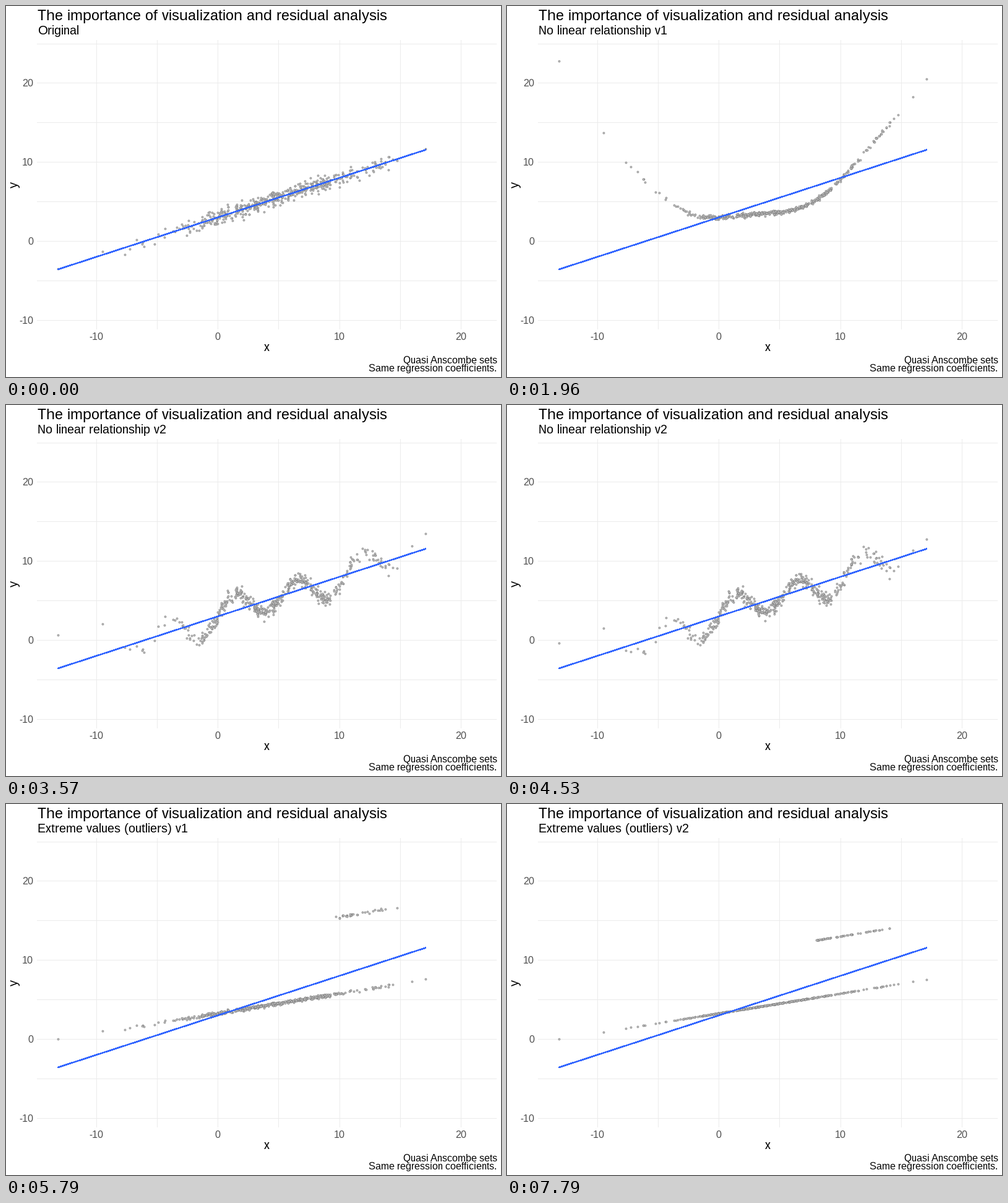
These frames come from a looping animation (800x600 px, 8000 ms). A matplotlib script:

```python
import matplotlib.pyplot as plt
import numpy as np
from matplotlib.animation import FuncAnimation

# whole-pixel glyph advances
plt.rcParams.update({"font.family": "Liberation Sans",
                     "text.hinting": "default", "text.hinting_factor": 1})

LOOP, STEP = 8000, 20
PX = 0.72  # points per pixel at 100 dpi
X0, X_UNIT, Y0, Y_UNIT = 342.2, 19.65, 380.28, 12.79
LEFT, RIGHT, TOP, BOTTOM = 50, 792, 55, 522

SUBTITLES = [
    "Original",
    "No linear relationship v1",
    "No linear relationship v2",
    "Extreme values (outliers) v1",
    "Extreme values (outliers) v2",
]

MORPH_STEPS = 36
ANCHORS = [(320, 1), (2350, 3), (4290, 5), (6130, 1)]  # time, step shown then


def to_px(x, y):
    return X0 + X_UNIT * np.asarray(x), Y0 - Y_UNIT * np.asarray(y)


def trend(x):
    return 3 + 0.5 * x


def build_sets(count=500):
    rng = np.random.default_rng(5)
    x = rng.normal(4.8, 4.6, 2 * count)
    x = np.append(x[(x > -8) & (x < 16.8)][:count], [-13.15, -9.5, 17.1])
    noise = rng.normal(0, 0.5, len(x)).clip(-1.5, 1.6)
    far_out = (x > 9.5) & (rng.random(len(x)) < 0.55)
    near_out = (x > 7.9) & (rng.random(len(x)) < 0.42)

    drift = 0.55 * np.sin(0.6 * x) + 0.07 * np.maximum(0, -6 - x) ** 2
    parabola = 0.0765 * ((x - 5) ** 2 - 25)
    wave = 1.85 * np.sin(1.2 * x)
    flat = 3.28 + 0.25 * x
    return x, [
        trend(x) + noise,
        trend(x) + parabola + drift + 0.28 * noise,
        trend(x) + wave + drift + 0.95 * noise,
        flat + 9.7 * far_out + 0.22 * noise,
        flat + 7.23 * near_out,
    ]


def morph_step(t, anchor, step):
    """Steps advance in triples lasting 100, 20 and 20 ms."""
    triples, rest = divmod(t - anchor, 140)
    step += 3 * triples + (rest >= 100) + (rest >= 120)
    return min(max(step, 0), MORPH_STEPS)


def pose(t):
    """Return the set being left and the raw progress to the next."""
    steps = [morph_step(t, *a) for a in ANCHORS]
    index = max(sum(s > 0 for s in steps) - 1, 0)
    return index, steps[index] / MORPH_STEPS


def cubic_in_out(p):
    return 4 * p**3 if p < 0.5 else 1 - 4 * (1 - p) ** 3


fig = plt.figure(figsize=(8, 6), dpi=100, facecolor="white")
ax = fig.add_axes([0, 0, 1, 1])
ax.set(xlim=(0, 800), ylim=(600, 0))
ax.axis("off")


def label(x, y, text, size, color="black", **kw):
    return ax.text(x, y, text, fontsize=size * PX, color=color, va="baseline", **kw)


for v in range(-10, 25, 5):
    gx = to_px(v, 0)[0]
    ax.plot([gx, gx], [TOP, BOTTOM], color="#EBEBEB", lw=PX)
    if v % 10 == 0:
        label(gx, 540, str(v), 16, "#4D4D4D", ha="center")
for v in range(-10, 30, 5):
    gy = to_px(0, v)[1]
    ax.plot([LEFT, RIGHT], [gy, gy], color="#EBEBEB", lw=PX)
    if v % 10 == 0:
        label(44, gy + 5.5, str(v), 16, "#4D4D4D", ha="right")

label(51, 23, "The importance of visualization and residual analysis", 24)
subtitle = label(51, 46, SUBTITLES[0], 20)
label(421.5, 558, "x", 20, ha="center")
label(19, 288.5, "y", 20, ha="center", rotation=90, rotation_mode="anchor")
label(793.5, 578, "Quasi Anscombe sets", 16, ha="right")
label(793.5, 591, "Same regression coefficients.", 16, ha="right")

xs, sets = build_sets()
dots, = ax.plot([], [], "o", ms=2.8 * PX, mew=0.9 * PX, mec="#868686", mfc="#DADADA")
ends = np.array([xs.min(), xs.max()])
ax.plot(*to_px(ends, trend(ends)), color="#3366FF", lw=1.5 * PX,
        antialiased=False, solid_capstyle="butt")


def draw(frame):
    index, progress = pose(frame * STEP + STEP // 2)
    w = cubic_in_out(progress)
    dots.set_data(*to_px(xs, (1 - w) * sets[index] + w * sets[index + 1]))
    subtitle.set_text(SUBTITLES[index + (progress > 0.5)])
    return dots, subtitle


anim = FuncAnimation(fig, draw, frames=LOOP // STEP, interval=STEP,
                     repeat=True, repeat_delay=0, blit=False)
plt.show()
```
